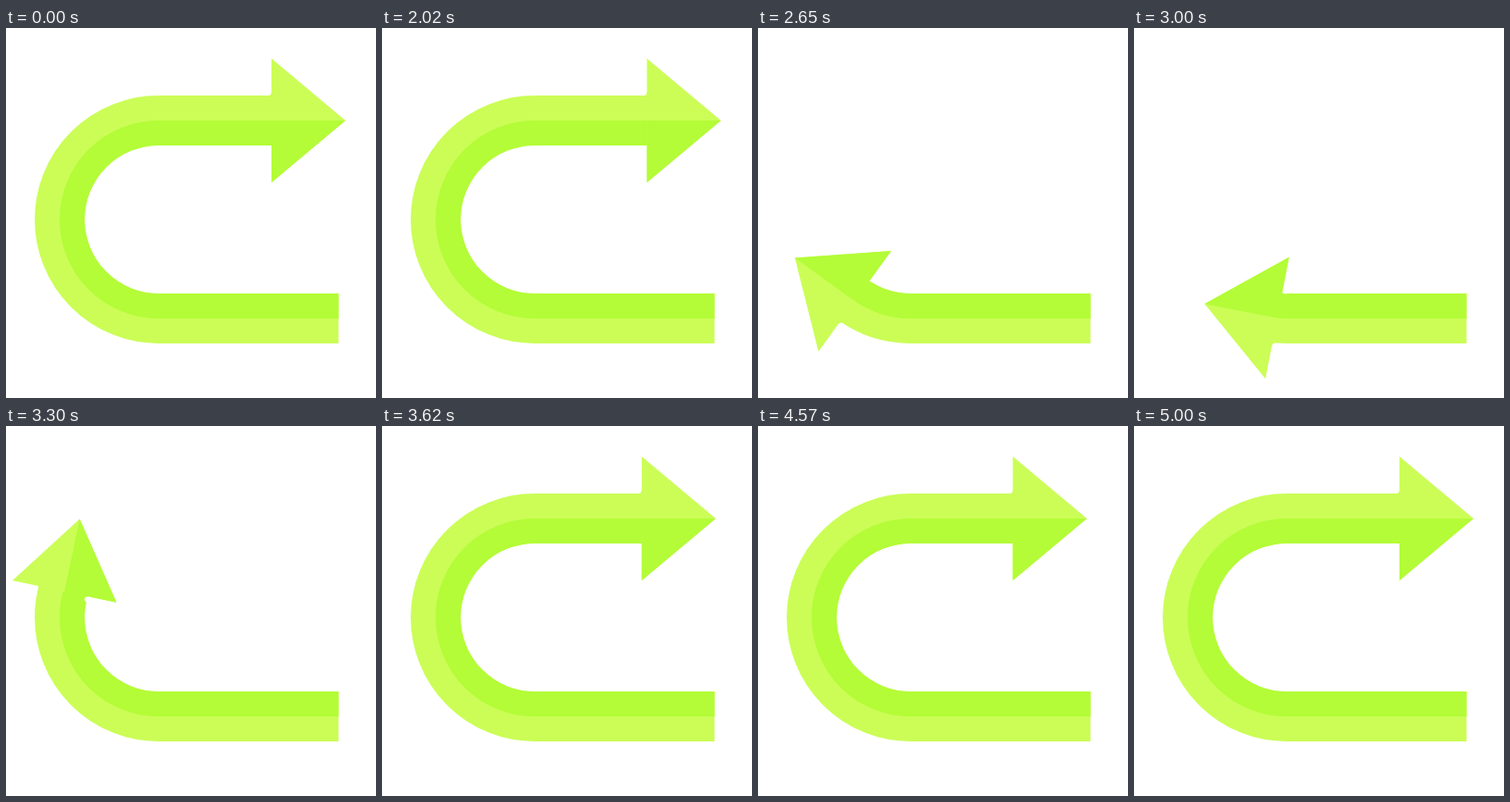
Recreate the animation shown at these times as an HTML page with a canvas. Size 400 px wide and 400 px high, loop 5.02 s.

```html
<!DOCTYPE html>
<html lang="en">
<head>
<meta charset="utf-8">
<title>Turning arrow</title>
<style>
  html, body { margin: 0; width: 100%; height: 100%; overflow: hidden; background: #fff; }
  canvas { display: block; width: 100vmin; height: 100vmin; }
</style>
</head>
<body>
<canvas id="stage" width="400" height="400"></canvas>
<script>
const ctx = document.getElementById('stage').getContext('2d');
const LOOP = 5020;
const LIGHT = '#cbfd56', DARK = '#b3fc37';
const CX = 165, CY = 207, R = 107;   // bend of the arrow
const TAIL = 359.5, END = 287;       // tail edge, resting base of the head
const STRAIGHT = END - CX;
const RAD = Math.PI / 180;

// time, distance pulled back from rest, easing handles into this key
const KEYS = [
  [2000, 0],
  [3000, 448, 0.34, 0.333],
  [3750, -26, 0.29, 0.637],
  [4455, 13, 0.333, 0.667],
  [5000, 0, 0.333, 0.667]
];

function ease(x, x1, x2) {
  let lo = 0, hi = 1;
  for (let i = 0; i < 30; i++) {
    const m = (lo + hi) / 2, n = 1 - m;
    const at = 3 * n * n * m * x1 + 3 * n * m * m * x2 + m * m * m;
    if (at < x) lo = m; else hi = m;
  }
  return lo * lo * (3 - 2 * lo);
}

function pullback(t) {
  for (let i = 1; i < KEYS.length; i++) {
    const [t0, d0] = KEYS[i - 1], [t1, d1, x1, x2] = KEYS[i];
    if (t <= t0) return d0;
    if (t < t1) return d0 + (d1 - d0) * ease((t - t0) / (t1 - t0), x1, x2);
  }
  return 0;
}

const bendAngle = d => Math.max(0, (d - STRAIGHT) / R);

function tube(d, radius, width, color) {
  const a = bendAngle(d);
  ctx.beginPath();
  ctx.moveTo(TAIL, CY + radius);
  ctx.lineTo(CX, CY + radius);
  ctx.arc(CX, CY, radius, Math.PI / 2, Math.PI * 1.5 - a);
  if (a === 0) ctx.lineTo(END - d, CY - radius);
  ctx.lineWidth = width;
  ctx.strokeStyle = color;
  ctx.stroke();
}

function fill(color, ...pts) {
  ctx.beginPath();
  pts.forEach(([x, y]) => ctx.lineTo(x, y));
  ctx.fillStyle = color;
  ctx.fill();
}

// The head turns slightly out of step with the bend.
function heading(deg) {
  if (deg < 90) return deg + 7 * Math.sin(deg * 2 * RAD);
  return deg - 5.6 * Math.max(0, (deg - 113) / 62) ** 2;
}

function head(d) {
  const a = bendAngle(d), deg = a / RAD;
  const squeeze = deg < 113 ? Math.sin(Math.PI * (deg / 113) ** 2.2) : 0;
  const k = 1 - 0.15 * squeeze, r = R - 1.5 * squeeze;
  const half = 67 * k;
  ctx.save();
  if (a > 0) ctx.translate(CX - r * Math.sin(a), CY - r * Math.cos(a));
  else ctx.translate(END - d, CY - R);
  ctx.rotate(-heading(deg) * RAD);

  ctx.beginPath();
  ctx.arc(-3.5, 30.2 * k, 3, 0, Math.PI * 2);
  ctx.fillStyle = '#fff';
  ctx.fill();

  ctx.beginPath();
  ctx.moveTo(-4, -26.5);
  ctx.quadraticCurveTo(-0.3, -27, 0, -31);
  ctx.lineTo(1, -26);
  ctx.fillStyle = LIGHT;
  ctx.fill();

  fill(LIGHT, [0, -half], [80, 0], [0, half]);
  fill(DARK, [0, 0], [80, 0], [0, half]);
  ctx.restore();
}

function draw(t) {
  const d = pullback(t);
  ctx.fillStyle = '#fff';
  ctx.fillRect(0, 0, 400, 400);
  tube(d - 4, R, 54, LIGHT);
  tube(d - 4, R - 13.5, 27, DARK);
  head(d);
}

const start = performance.now();
function tick() {
  draw((performance.now() - start) % LOOP);
  requestAnimationFrame(tick);
}
tick();
</script>
</body>
</html>
```
